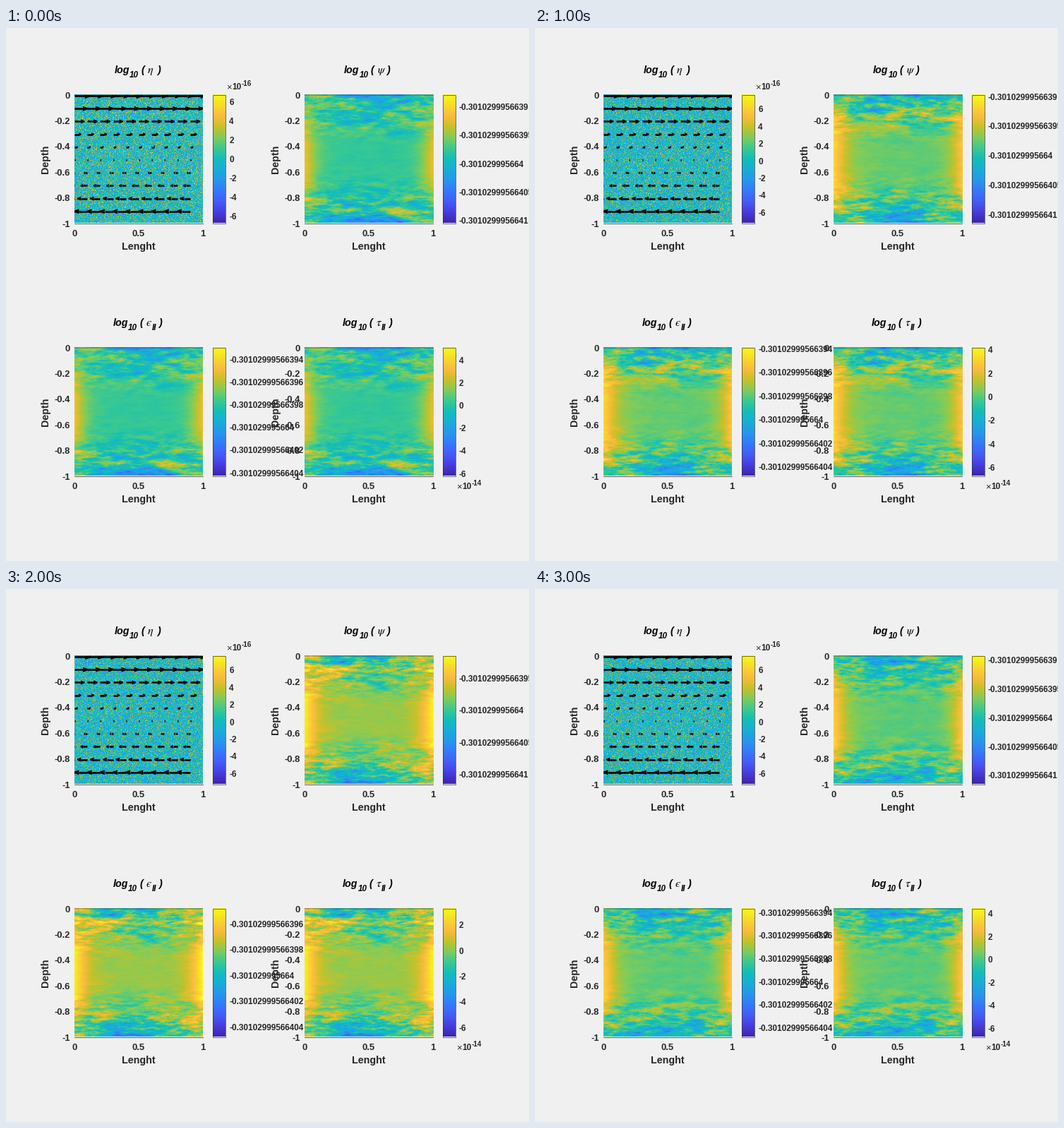
These frames come from a looping animation (741 by 755 pixels, 3500 ms). A matplotlib script:

```python
import numpy as np
import matplotlib.pyplot as plt
from matplotlib.animation import FuncAnimation
from matplotlib.colors import LinearSegmentedColormap
from matplotlib.patches import Rectangle

W, H, DPI = 741, 755, 64
PX = 72 / DPI            # points per pixel
SIDE = 182               # panel size, also the grid resolution
INK = "#262626"
QUANTUM = 0.482          # rounding step of log10 near 1, in 1e-16
OFFSET = 1.93            # strain rate minus stress, in 1e-14

PARULA = LinearSegmentedColormap.from_list("parula", [
    "#3e26a8", "#463de0", "#475bf9", "#347afd", "#2797eb", "#17aeda",
    "#12beb9", "#3cc990", "#81cc59", "#c8c129", "#fbbc3d", "#f7db2b",
    "#f9fb15"])

# colour limits per step: viscosity (quanta), then stress (1e-14)
LIMITS = [(-14, 14, -6.18, 5.12), (-18, 16, -7.85, 3.86),
          (-15, 16, -6.68, 4.22), (-15, 16, -7.57, 5.36),
          (-15, 16, -6.70, 3.30), (-17, 16, -8.16, 5.10),
          (-15, 16, -6.72, 4.45)]

PANELS = [(x, y) for y in (94.5, 452.5) for x in (97, 422.7)]
SYMBOLS = [(r"\eta", ""), (r"\psi", ""), (r"\mathit{ϵ}", "II"), (r"\tau", "II")]

fig = plt.figure(figsize=(W / DPI, H / DPI), dpi=DPI, facecolor="#f0f0f0")
ax = fig.add_axes([0, 0, 1, 1])
ax.axis("off")


def put(x, y, s, size=13, ha="left", color=INK, weight="bold", **kw):
    """Text whose digits are centred on y."""
    return ax.text(x, y + 0.35 * size, s, fontsize=size * PX, ha=ha,
                   va="baseline", color=color, weight=weight,
                   family="Liberation Sans", zorder=6, **kw)


def image(x, y, width, height, data):
    return ax.imshow(data, cmap=PARULA, vmin=0, vmax=1, aspect="auto",
                     extent=(x, x + width, y + height, y),
                     interpolation="nearest", zorder=2)


def smoothstep(t):
    t = np.clip(t, 0, 1)
    return t * t * (3 - 2 * t)


def noise_field(i):
    """Rounding noise with a bright tail, scaled to the colour limits."""
    rng = np.random.default_rng(40 + i)
    low, high = LIMITS[i][:2]
    quanta = np.round(rng.normal(-1, 2.6, (SIDE, SIDE)))
    quanta += 7 * (rng.random((SIDE, SIDE)) < 0.17)
    return (quanta - low) / (high - low)


def streaks(rng):
    """Random texture stretched along x, with unit deviation."""
    k = np.fft.fftfreq(SIDE) * SIDE
    shape = (1 + (k[None] / 3) ** 2 + (k[:, None] / 12) ** 2) ** -0.85
    white = rng.normal(size=(SIDE, SIDE))
    f = np.fft.ifft2(np.fft.fft2(white) * shape).real
    return f / f.std()


def flow_field(i):
    """Calm middle, bright sides, streaky and darker top and bottom."""
    rng = np.random.default_rng(70 + i)
    low, high = LIMITS[i][2:]
    x, y = np.meshgrid(*[(np.arange(SIDE) + 0.5) / SIDE] * 2)
    u = np.abs(2 * y - 1)
    glow = np.exp(-(x / 0.1) ** 1.3) + np.exp(-((1 - x) / 0.1) ** 1.3)
    drop = np.where(y < 0.5, 0.28, 0.38) * low * u ** 3.5
    f = 0.2 + rng.normal(0, 0.3) * (2 * x - 1)
    f += 2.8 * glow * np.exp(-(u / 0.75) ** 4)
    f += drop * (0.3 + 0.7 * np.sin(np.pi * x) ** 2)
    f += (0.1 + 0.95 * smoothstep((u - 0.15) / 0.7)) * streaks(rng)
    return (f - low) / (high - low)


def draw_axes(left, top):
    mid, right, bottom = left + SIDE / 2, left + SIDE, top + SIDE
    for y, width in ((top, 0.5), (bottom, 0.8)):
        ax.plot([left, right], [y, y], color=INK, lw=width, zorder=4)
    for k in range(3):
        put(left + k * SIDE / 2, bottom + 14, f"{k / 2:g}", ha="center")
    for k in range(6):
        put(left - 6, top + 0.5 + k * SIDE / 5, f"{0 - k / 5:g}", ha="right")
    put(mid, bottom + 32, "Lenght", 14.3, ha="center")
    ax.text(left - 41, top + SIDE / 2, "Depth", rotation=90,
            fontsize=14.3 * PX, ha="center", va="center", color=INK,
            weight="bold", family="Liberation Sans", zorder=6)


def draw_title(left, top, symbol, sub):
    x, y = left + SIDE / 2 - 34.5 - len(sub), top - 35.5
    style = dict(color="black", style="italic")
    put(x, y, "log", 14.3, **style)
    put(x + 21.5, y + 7, "10", 11.6, **style)
    put(x + 37.5, y, "(", 14.3, **style)
    ax.text(x + 46.5, y + 5, f"${symbol}$", fontsize=16 * PX,
            math_fontfamily="stix", va="baseline", zorder=6)
    put(x + 55, y + 7, sub, 11.6, **style)
    put(x + 60.5 + 2.3 * len(sub), y, ")", 14.3, **style)


def draw_bar(left, top):
    x = left + 196
    image(x, top, 18, SIDE, np.linspace(1, 0, 256)[:, None])
    ax.add_patch(Rectangle((x, top), 18, SIDE, fill=False, ec=INK,
                           lw=0.7, zorder=4))


def draw_arrows(left, top):
    """Simple shear: speed falls linearly with depth and changes sign."""
    clip = Rectangle((left, top), SIDE, SIDE, transform=ax.transData)
    for row in range(10):
        y = top + 1.5 + SIDE / 10 * row
        length = 48 * (0.5 - row / 10) or 1.5
        half = 0.11 * abs(length) + 1.3
        for col in range(10):
            x = left + SIDE / 10 * col
            back, tip = x + 0.62 * length, x + length
            shaft, = ax.plot([x, back], [y, y], color="black", lw=2.6 * PX,
                             solid_capstyle="butt", zorder=5)
            head, = ax.fill([back, tip, tip, back],
                            [y - half, y - 1, y + 1, y + half],
                            color="black", lw=0, zorder=5)
            shaft.set_clip_path(clip)
            head.set_clip_path(clip)


def power(x, y, exponent):
    return [put(x, y, "×", 13, weight="normal"),
            put(x + 8.7, y, "10", 11.7),
            put(x + 22, y - 4.5, exponent, 10)]


def ticks(panel, low, high, step, label):
    """Labels at each multiple of step inside the colour limits."""
    left, top = PANELS[panel]
    first, last = np.ceil((low - 0.1) / step), np.floor(high / step)
    return [put(left + 219.3, top + SIDE * (high - n * step) / (high - low),
                label(n * step), 11.7)
            for n in range(int(first), int(last) + 1)]


def long_label(v):
    return f"-0.{30102999566400 - v}".rstrip("0")


for panel, symbol in zip(PANELS, SYMBOLS):
    draw_axes(*panel)
    draw_title(*panel, *symbol)
    draw_bar(*panel)
draw_arrows(*PANELS[0])
power(638, 649, "-14")

steps = range(len(LIMITS))
noise = [noise_field(i) for i in steps]
flow = [flow_field(i) for i in steps]
maps = [image(*panel, SIDE, SIDE, flow[0]) for panel in PANELS]
labels = []

ax.set_xlim(0, W)
ax.set_ylim(H, 0)


def update(i):
    while labels:
        labels.pop().remove()
    maps[0].set_data(noise[i])
    for m in maps[1:]:
        m.set_data(flow[i])

    eta = QUANTUM * np.array(LIMITS[i][:2])
    tau = np.array(LIMITS[i][2:])
    wide = np.ptp(eta) > 15.5
    labels.extend(ticks(0, *eta, 5 if wide else 2, str))
    labels.extend(ticks(1, *(2 * tau + OFFSET), 5, long_label))
    labels.extend(ticks(2, *(tau + OFFSET), 2, long_label))
    labels.extend(ticks(3, *tau, 2, str))
    labels.extend(power(312, 291.5 if wide else 83, "-16"))
    return maps + labels


anim = FuncAnimation(fig, update, frames=len(LIMITS), interval=500,
                     repeat=True, repeat_delay=0,
                     init_func=lambda: update(0), blit=False)
plt.show()
```
